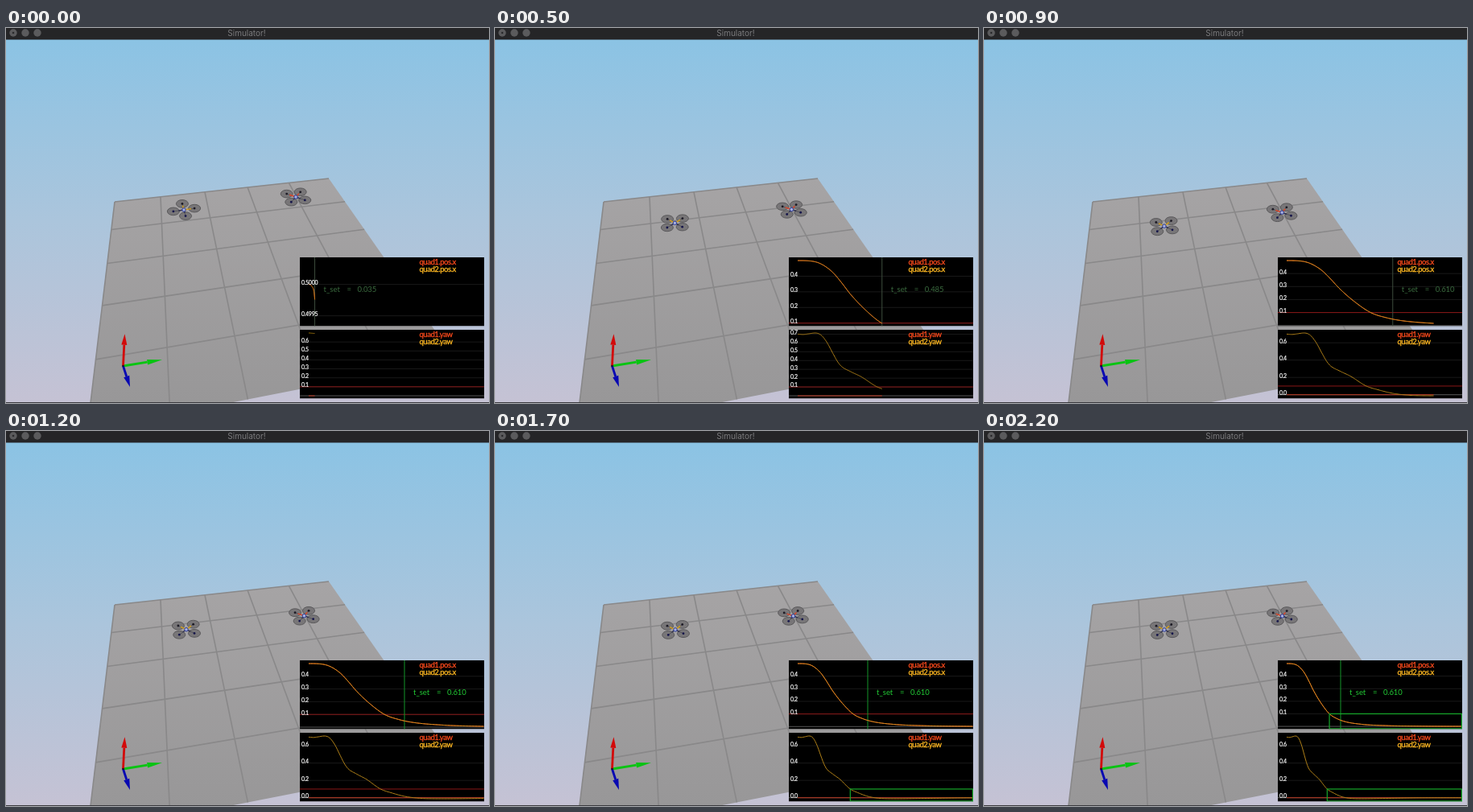
Write an HTML page with a canvas that moves like this. It is 600 px wide and 466 px high and loops after 2.3 s.

```html
<!DOCTYPE html>
<html lang="en">
<head>
<meta charset="utf-8">
<title>Simulator</title>
<style>
html, body { margin: 0; width: 100%; height: 100%; overflow: hidden; background: #252527; }
canvas { display: block; width: 600px; height: 466px; }
</style>
</head>
<body>
<canvas id="stage" width="600" height="466"></canvas>
<script>
const ctx = document.getElementById('stage').getContext('2d');
const STEP = 100, LOOP = 2300, SETTLE = 0.61, BAND = 0.1;
const RED = '#fa4a1c', YELLOW = '#ffb822';

// Key points as [simulated seconds, value]
const POS = [[0, .5], [.018, .49997], [.035, .49976], [.111, .489], [.157, .464], [.204, .422],
  [.25, .362], [.305, .283], [.39, .184], [.483, .1], [.574, .06], [.665, .037],
  [.845, .017], [1.115, .0065], [1.5, .002], [2, .0005]];
const YAW = [[0, .7], [.03, .696], [.06, .703], [.1, .713], [.134, .69], [.167, .61], [.204, .476],
  [.227, .395], [.25, .337], [.305, .274], [.366, .215], [.458, .1], [.528, .056], [.6, .02],
  [.665, .001], [.75, -.01], [.87, -.012], [1.1, -.008], [1.5, -.001], [2, 0]];
const TILT = [[0, 1], [.125, .82], [.305, .7], [.5, .95], [.665, 1.03], [.9, 1], [2, 1]];

// Smooth curve through the key points, without overshoot
function curve(pts, t) {
  const last = pts.length - 1;
  if (t >= pts[last][0]) return pts[last][1];
  let i = 0;
  while (pts[i + 1][0] <= t) i++;
  const secant = k => (pts[k + 1][1] - pts[k][1]) / (pts[k + 1][0] - pts[k][0]);
  const slope = k => {
    if (k === 0 || k === last) return 0;
    const before = secant(k - 1), after = secant(k);
    if (before * after <= 0) return 0;
    const mean = (before + after) / 2;
    const limit = 3 * Math.min(Math.abs(before), Math.abs(after));
    return Math.sign(mean) * Math.min(Math.abs(mean), limit);
  };
  const [t0, v0] = pts[i], [t1, v1] = pts[i + 1];
  const h = t1 - t0, s = (t - t0) / h, s2 = s * s, s3 = s2 * s;
  return (2 * s3 - 3 * s2 + 1) * v0 + (s3 - 2 * s2 + s) * h * slope(i)
    + (3 * s2 - 2 * s3) * v1 + (s3 - s2) * h * slope(i + 1);
}

function simTime(n) {
  if (n <= 12) return .035 + .09 * n;
  return n <= 17 ? 1.115 + .082 * (n - 12) : 1.525 + .091 * (n - 17);
}

function line(points, color, width) {
  ctx.beginPath();
  points.forEach(p => ctx.lineTo(p[0], p[1]));
  ctx.strokeStyle = color;
  ctx.lineWidth = width;
  ctx.stroke();
}

function poly(points, fill) {
  ctx.beginPath();
  points.forEach(p => ctx.lineTo(p[0], p[1]));
  ctx.closePath();
  ctx.fillStyle = fill;
  ctx.fill();
}

function oval(x, y, rx, ry, fill, stroke) {
  ctx.beginPath();
  ctx.ellipse(x, y, rx, ry, 0, 0, 7);
  ctx.fillStyle = fill;
  ctx.fill();
  if (stroke) {
    ctx.strokeStyle = stroke;
    ctx.lineWidth = 1;
    ctx.stroke();
  }
}

// weight thickens the thin plot lettering
function text(str, x, y, size, color, spacing = 0, weight = 0) {
  ctx.font = size + 'px Lato, Inter, sans-serif';
  ctx.letterSpacing = spacing + 'px';
  ctx.fillStyle = color;
  ctx.fillText(str, x, y);
  if (weight) {
    ctx.strokeStyle = color;
    ctx.lineWidth = weight;
    ctx.strokeText(str, x, y);
  }
}

function fade(y0, y1, ...colors) {
  const g = ctx.createLinearGradient(0, y0, 0, y1);
  colors.forEach((c, i) => g.addColorStop(i / (colors.length - 1), c));
  return g;
}

// Ground tile corner to screen
function ground(u, v) {
  const w = 1 + .01818 * u - .0897 * v;
  return [(135 + 60.49 * u - 15.88 * v) / w, (216 - 2.4 * u + 12.02 * v) / w];
}

function drawScene() {
  ctx.fillStyle = fade(14, 466, '#8bc3e4', '#abc5dc', '#c5c2d4');
  ctx.fillRect(0, 0, 600, 466);
  poly([ground(0, 0), ground(5, 0), ground(5, 5), ground(0, 5)], fade(187, 466, '#a6a4a5', '#989798'));
  for (let i = 0; i < 5; i++) {
    line([ground(i, 0), ground(i, 5)], '#898889', 1.6);
    line([ground(0, i), ground(5, i)], '#898889', 1.6);
  }
}

function arrow(x, y, neck, color, half) {
  const ox = 145.5, oy = 420;
  const dx = x - ox, dy = y - oy, len = Math.hypot(dx, dy);
  const nx = -dy / len * half, ny = dx / len * half;
  const bx = ox + dx * neck, by = oy + dy * neck;
  line([[ox, oy], [bx, by]], color, 2.8);
  poly([[x, y], [bx + nx, by + ny], [bx - nx, by - ny]], color);
}

function drawAxes() {
  arrow(194, 412.3, .62, '#08c412', 3.2);
  arrow(147.5, 380.3, .66, '#d20a0a', 3.5);
  arrow(154, 446, .5, '#0808b2', 3.7);
  oval(145.5, 420, 1.3, 1.3, '#151530');
}

// a and b are the half-diagonals of the level, unrotated frame
function drawQuad(x, y, a, b, yaw, tilt, color) {
  const c = Math.cos(yaw), s = Math.sin(yaw);
  const mix = (p, q, m, n) => [p[0] * m + q[0] * n, (p[1] * m + q[1] * n) * tilt];
  const A = mix(a, b, c, s), B = mix(b, a, c, -s);
  const rotors = [[A, 1], [B, 1], [B, -1], [A, -1]]
    .map(([d, k]) => [x + d[0] * k, y + d[1] * k]);
  rotors.forEach(r => oval(r[0], r[1], 7.5, 4.9 * (.4 + .6 * tilt), '#787678', '#5a595b'));
  rotors.forEach((r, i) => {
    line([[x, y], r], '#4a4a55', .8);
    const part = i < 2 ? .7 : .5;
    line([[x, y], [x + (r[0] - x) * part, y + (r[1] - y) * part]], i < 2 ? color : '#30304c', 1.4);
    oval(r[0], r[1], 1.4, 1.4, i < 2 ? '#1c1a24' : '#16164a');
  });
  oval(x, y, 2.2, 2.2, '#aab2de', '#2a3a98');
}

function niceStep(range) {
  const base = 10 ** Math.floor(Math.log10(range) + 1e-6);
  const lead = range / base;
  return base * (lead < 3 ? .5 : lead < 7.17 ? 1 : 2);
}

function drawPlot(top, name, series, t, entered, settles) {
  const left = 365, right = 594, height = 85.5, bottom = top + height, x0 = 376;
  const scale = Math.min(216, 217.5 / t);
  const px = s => x0 + s * scale;

  const data = [];
  for (let i = 0; i <= 160; i++) data.push([t * i / 160, curve(series, t * i / 160)]);
  const values = data.map(d => d[1]);
  if (!settles) values.push(0);
  let lo = Math.min(...values), hi = Math.max(...values);
  if (hi - lo < .001) {
    const mid = (hi + lo) / 2;
    lo = mid - .0005;
    hi = mid + .0005;
  }
  const py = v => top + 4 + (hi - v) / (hi - lo) * 78;

  ctx.save();
  ctx.beginPath();
  ctx.rect(left, top, right - left, height);
  ctx.clip();
  ctx.fillStyle = '#000';
  ctx.fillRect(left, top, right - left, height);

  const step = niceStep(hi - lo);
  const digits = Math.max(1, Math.ceil(-Math.log10(step) - 1e-6));
  const ticks = [];
  for (let k = Math.ceil(lo / step + 1e-3); k * step <= hi - step * .05 || k * step <= hi && !settles && t > .1; k++) {
    ticks.push(k * step);
  }
  ticks.forEach(v => line([[left, py(v)], [right, py(v)]], '#191919', 1));
  line([[left, py(0)], [right, py(0)]], '#555', 1);

  const boxed = t >= entered + 1.05;
  if (!boxed) line([[left, py(BAND)], [right, py(BAND)]], '#8a1717', 1);

  if (settles) {
    const shown = Math.min(t, SETTLE), x = px(shown), done = t >= 1.11;
    const ink = done ? '#22cc35' : '#3a6a3e';
    line([[x, top], [x, bottom]], done ? '#14962a' : '#3c4c3c', 1);
    text('t_set', x + 11, top + 43, 9.5, ink);
    text('=', x + 40, top + 43, 9.5, ink);
    text(shown.toFixed(3), x + 53, top + 43, 9.5, ink, -.15);
  }

  const path = data.map(d => [px(d[0]), py(d[1])]);
  line(settles ? path : [[x0, py(0)], [px(t), py(0)]], '#b8321c', 1);
  line(path, settles ? '#d8921c' : '#b08018', 1);

  if (boxed) {
    const x = px(entered), y = py(BAND);
    ctx.strokeStyle = '#16a82a';
    ctx.lineWidth = 1.2;
    ctx.strokeRect(x, y, right - .6 - x, Math.min(py(-BAND), bottom - .6) - y);
  }

  ticks.forEach(v => text(Math.abs(v).toFixed(digits), 367, py(v) + .4, 7, '#fff', -.3, .2));
  text('quad1.' + name, 513.5, top + 9, 9.5, RED, -.45, .3);
  text('quad2.' + name, 513.5, top + 18, 9.5, YELLOW, -.45, .3);
  ctx.restore();
}

function drawFrame() {
  ctx.fillStyle = '#252527';
  ctx.fillRect(0, 0, 600, 14.5);
  [9, 24, 39].forEach(x => oval(x, 6, 4.7, 4.7, '#5b5b5d'));
  oval(9, 6, 1.3, 1.3, '#2b2b2d');
  ctx.textAlign = 'center';
  ctx.font = '10px Inter, sans-serif';
  ctx.letterSpacing = '0px';
  ctx.fillStyle = '#7b7b7d';
  ctx.fillText('Simulator!', 299, 9.7);
  ctx.textAlign = 'left';
  ctx.fillStyle = '#3a3a3e';
  ctx.fillRect(0, 465, 600, 1);
}

function render(n) {
  const t = simTime(n), yaw = curve(YAW, t), tilt = curve(TILT, t);
  const done = 1 - curve(POS, t) / .5, drop = done ** 1.15;
  drawScene();
  drawAxes();
  drawQuad(360 + 10.5 * done, 210 + 20 * drop, [-11.3, -4], [5.7, -6.4], 0, tilt, '#dc4628');
  drawQuad(221 + 3 * done, 226 + 21 * drop, [-10, -4.75], [8.75, -6.5], yaw, tilt, '#d6a21c');
  drawPlot(285, 'pos.x', POS, t, .483, true);
  drawPlot(375, 'yaw', YAW, t, .458, false);
  drawFrame();
}

const start = performance.now();
let shown = -1;
function tick() {
  const n = Math.floor((performance.now() - start) % LOOP / STEP);
  if (n !== shown) render(shown = n);
  requestAnimationFrame(tick);
}
tick();
</script>
</body>
</html>
```
